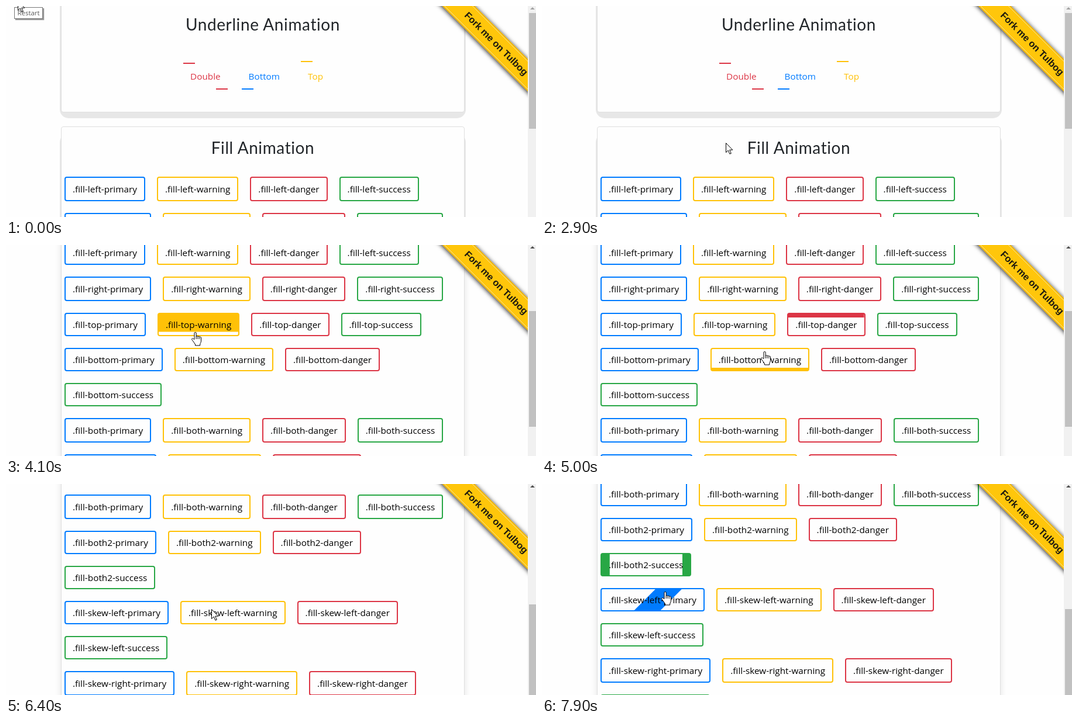
Animation, 906 px wide and 361 px high, one loop 8000 ms. Source, as an HTML page:

```html
<!DOCTYPE html>
<html lang="en">
<head>
<meta charset="utf-8">
<title>Hover animations</title>
<style>
  html, body { margin: 0; width: 100%; height: 100%; overflow: hidden; background: #fefefe; }
  body { font: 15.3px "Open Sans", "Noto Sans", sans-serif; color: #000; }
  .stage { position: relative; width: 906px; height: 361px; overflow: hidden; }
  .stage div, .stage svg { position: absolute; box-sizing: border-box; white-space: nowrap; }
  .page { left: 0; top: 0; width: 892px; height: 1300px; will-change: transform; }

  .card { left: 94px; width: 690px; border: 1px solid #dfdfdf; border-radius: 4px; background: #fefefe; }
  .card::before { content: ""; position: absolute; z-index: -1; inset: 11px -3px -11px; border-radius: 15px; background: #e7e7e7; }
  .scrolled .card::before { inset: 8px 0 -11px; box-shadow: 0 0 12px rgba(0,0,0,.13); }
  .card h2 { margin: 0; position: absolute; left: 0; width: 100%; text-align: center; color: #212529;
    font: 400 28px/40px Lato, "Open Sans", sans-serif; letter-spacing: .6px; }

  .primary { --c: #007bff; } .warning { --c: #ffc107; } .danger { --c: #dc3545; } .success { --c: #28a745; }
  a { --p: 0; --ink: linear-gradient(var(--c), var(--c)); white-space: nowrap; padding: 0 12px; }

  .links { left: 303px; top: 97px; display: flex; align-items: start; gap: 24px; line-height: 46px; }
  .links a { color: var(--c); --w: calc(20px + var(--p) * (100% - 20px)) 2px no-repeat; }
  .double { background: var(--ink) left top / var(--w), var(--ink) right bottom / var(--w); }
  .under { background: var(--ink) left bottom / var(--w); }
  .over { background: var(--ink) left top / var(--w); margin-top: -3px; padding-block: 3px !important; }

  .buttons { left: 100px; top: 292px; width: 676px; }
  .buttons section { display: flex; flex-wrap: wrap; gap: 20px; margin-bottom: 20px; }
  .buttons a { position: relative; overflow: hidden; border: 2px solid var(--c); border-radius: 4px; line-height: 36px; }
  .tall a { line-height: 38px; }
  .buttons span { position: relative; }
  .left { background: var(--ink) left / calc(var(--p) * 100%) 100% no-repeat; }
  .top { background: var(--ink) top / 100% calc(var(--p) * 100%) no-repeat; }
  .bottom { background: var(--ink) bottom / 100% calc(var(--p) * 100%) no-repeat; }
  .both2 { --half: calc(var(--p) * 50%) 100% no-repeat;
    background: var(--ink) left / var(--half), var(--ink) right / var(--half); }
  .skew-left::before { content: ""; position: absolute; top: 0; left: 55%; height: 100%; width: calc(var(--p) * 240px);
    background: var(--c); transform: translateX(-50%) skewX(-45deg); }

  .view { left: 0; top: 0; width: 892px; height: 361px; overflow: hidden; }
  .ribbon { left: 668px; top: 45px; width: 340px; height: 39px; transform: rotate(45deg); text-align: center;
    font: 700 16.3px/39px "Liberation Sans", Arial, sans-serif; color: #1d1a10; background: #ffc60b;
    box-shadow: 0 1px 7px 1px rgba(0,0,0,.75), inset 0 2px #f0b400, inset 0 -2px #f0b400, inset 0 3px #ffe27a, inset 0 -3px #ffe27a; }
  .bar { left: 892px; top: 0; width: 14px; height: 361px; background: #f1f1f1; }
  .thumb { left: 2px; top: 12px; width: 12px; height: 198px; background: #c1c1c1; }
  .arrow-up { left: 4px; top: 2px; border: 4px solid transparent; border-top: 0; border-bottom-color: #a3a3a3; }
  .scrolled .arrow-up { border-bottom-color: #505050; }
  .tip { left: 14px; top: 2px; width: 49px; height: 20px; border: 1px solid #767676; background: #fff; color: #575757;
    font-size: 11.4px; line-height: 18px; text-align: center; box-shadow: 2px 2px 1px #999; }
  .cursor { left: 0; top: 0; overflow: visible; }
  .cursor path { fill: #fff; stroke: #000; stroke-linejoin: round; }
</style>
</head>
<body>
<div class="stage" id="stage">
  <div class="page" id="page">
    <div class="card" style="top:-60px;height:242px"><h2 style="top:70px">Underline Animation</h2></div>
    <div class="card" style="top:206px;height:1050px"><h2 style="top:15px">Fill Animation</h2></div>
    <div class="links">
      <a class="double danger">Double</a><a class="under primary">Bottom</a><a class="over warning">Top</a>
    </div>
    <div class="buttons" id="buttons"></div>
  </div>
  <div class="view"><div class="ribbon">Fork me on Tulbog</div></div>
  <div class="bar"><div class="arrow-up"></div><div class="thumb" id="thumb"></div></div>
  <div class="tip" id="tip">Restart</div>
  <svg class="cursor" id="cursor" width="20" height="26">
    <path id="arrow" d="M.5.5V16.6L4.2 13 6.9 19.2 9.3 18.2 6.7 12.2H11.8Z"/>
    <g id="hand" transform="translate(-6 0)">
      <path d="M5 12.5V2a1.6 1.6 0 0 1 3.2 0V8a1.4 1.4 0 0 1 2.8.3 1.4 1.4 0 0 1 2.8.8 1.3 1.3 0 0 1 2.7.9V15c0 3-1.5 4-1.8 6v2H6.5V21C5 18.5 3 16 1 13.2-.3 11.2 1.8 10 3.2 11.4Z"/>
      <path d="M8.2 8v4M11 8.5V12M13.8 9.5V12"/>
    </g>
  </svg>
</div>
<script>
const LOOP = 8000, STEP = 100, FADE = 300;
const $ = id => document.getElementById(id);
const clamp = v => Math.min(1, Math.max(0, v));

const tones = ["primary", "warning", "danger", "success"];
const kinds = ["left", "right", "top", "bottom", "both", "both2", "skew-left", "skew-right"];
const tallKinds = ["left", "right", "both", "skew-right"];
$("buttons").innerHTML = kinds.map(kind =>
  `<section class="${tallKinds.includes(kind) ? "tall" : ""}">` + tones.map(tone =>
    `<a class="${kind} ${tone}"><span>.fill-${kind}-${tone}</span></a>`).join("") + "</section>").join("");

// Pointer stops: arrival time, x, y, departure time if it rests
const stops = [
  [0, 20, -9, 100], [350, 250, 180], [600, 556, 234], [930, 340, 127, 1330],
  [1370, 355, 127], [1425, 405, 128], [1600, 447, 130], [1760, 530, 140, 2150],
  [2460, 460, 327], [2900, 314, 234, 3100], [3400, 320, 223, 3860],
  [3935, 322, 152], [4100, 323, 149, 4150], [4330, 412, 141, 4600], [4750, 460, 140],
  [5000, 380, 182], [5350, 215, 198, 5520], [5565, 213, 216], [5720, 206, 236],
  [5800, 204, 242, 5850], [6050, 351, 214, 6620], [6950, 345, 74, 7330],
  [7500, 200, 80], [7575, 205, 118], [7855, 209, 178], [7900, 210, 184]
];

function pointerAt(t) {
  const i = stops.findIndex(stop => stop[0] > t);
  const [, bx, by] = stops.at(i);
  if (i < 0) return [bx, by];
  const [arrive, ax, ay, leave = arrive] = stops[i - 1];
  const f = clamp((t - leave) / (stops[i][0] - leave));
  return [ax + (bx - ax) * f, ay + (by - ay) * f];
}

const SCROLLS = [{ from: 3500, to: 3850 }, { from: 6080, to: 6463 }], SCROLL_BY = 300;
const smooth = u => u * u * (3 - 2 * u);
const scrollAt = t => SCROLLS.reduce((sum, s) =>
  sum + SCROLL_BY * smooth(clamp((t - s.from) / (s.to - s.from))), 0);

// CSS "ease": cubic-bezier(.25, .1, .25, 1)
function ease(x) {
  if (x <= 0) return 0;
  if (x >= 1) return 1;
  const curve = (u, a, b) => 3 * a * u * (1 - u) ** 2 + 3 * b * u * u * (1 - u) + u ** 3;
  let lo = 0, hi = 1;
  for (let i = 0; i < 20; i++) {
    const mid = (lo + hi) / 2;
    if (curve(mid, .25, .25) < x) lo = mid; else hi = mid;
  }
  return curve(lo, .1, 1);
}

// Walk the pointer path once and note when it enters and leaves each part
function findVisits() {
  const parts = [...document.querySelectorAll("a")].map(el => ({ el, box: el.getBoundingClientRect(), visits: [] }));
  let current = null, last = "";
  for (let t = 0; t < LOOP; t += 5) {
    const [x, y] = pointerAt(t), offset = scrollAt(t), place = `${x},${y}`;
    const scrolling = SCROLLS.some(s => t > s.from && t < s.to);
    let under = current;
    if (scrolling) under = null;
    else if (place !== last) under = parts.find(({ box }) =>
      x >= box.left && x < box.right && y + offset >= box.top && y + offset < box.bottom) || null;
    if (under !== current) {
      if (current) current.visits.at(-1).leave = t;
      if (under) under.visits.push({ enter: t, leave: LOOP });
      current = under;
    }
    last = place;
  }
  return parts.filter(part => part.visits.length);
}

function progress(t, { enter, leave }) {
  if (t < leave) return ease((t - enter) / FADE);
  const peak = ease((leave - enter) / FADE);
  return peak * (1 - ease((t - leave) / (FADE * peak)));
}

const parts = findVisits();

function draw(t) {
  const [x, y] = pointerAt(t), offset = scrollAt(t);
  for (const { el, visits } of parts)
    el.style.setProperty("--p", Math.max(...visits.map(v => progress(t, v))).toFixed(4));
  const pointing = parts.some(({ visits }) => visits.some(v => t >= v.enter && t < v.leave));
  $("page").style.transform = `translateY(${-Math.round(offset)}px)`;
  $("thumb").style.transform = `translateY(${Math.round(offset * .336)}px)`;
  $("stage").classList.toggle("scrolled", offset > 0);
  $("tip").style.display = t < 300 ? "" : "none";
  $("arrow").style.display = pointing ? "none" : "";
  $("hand").style.display = pointing ? "" : "none";
  $("cursor").style.transform = `translate(${Math.round(x)}px, ${Math.round(y)}px)`;
}

const start = performance.now();
function tick(now) {
  const t = Math.max(0, now - start) % LOOP;
  draw(Math.floor(t / STEP) * STEP);
  requestAnimationFrame(tick);
}
draw(0);
requestAnimationFrame(tick);
</script>
</body>
</html>
```
